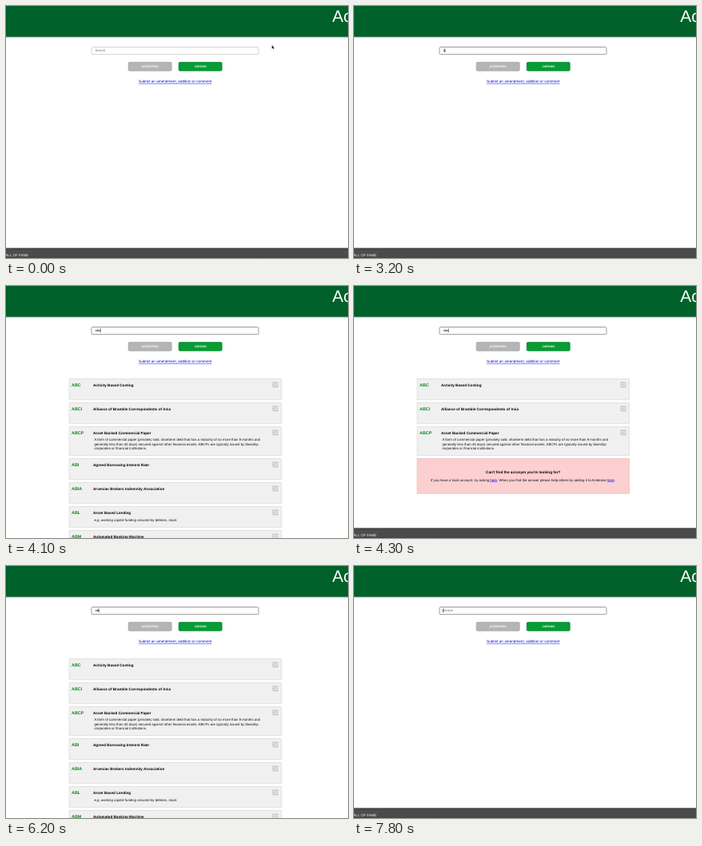
Write an HTML page that moves like this. It is 428x316 px and loops after 8000 ms.

```html
<!DOCTYPE html>
<html lang="en">
<head>
<meta charset="utf-8">
<title>Acronym search</title>
<style>
  html, body { margin: 0; width: 100%; height: 100%; overflow: hidden; background: #fff; }
  svg { display: block; width: 428px; height: 316px; }
  text { font-family: "Liberation Sans", Arial, sans-serif; text-rendering: geometricPrecision; white-space: pre; }
  .bold { font-weight: bold; }
  .code { font-size: 5.4px; font-weight: bold; fill: #00891c; }
  .title { font-size: 4.65px; font-weight: bold; fill: #000; }
  .note { font-size: 4.35px; fill: #111; }
  .link { fill: #0000e6; text-decoration: underline; }
  .button { font-size: 3.6px; font-weight: bold; fill: #fff; text-anchor: middle; }
  .mid { text-anchor: middle; }
</style>
</head>
<body>
<svg viewBox="0 0 428 316">
  <defs>
    <linearGradient id="shade" x2="0" y2="1">
      <stop offset="0" stop-color="#000" stop-opacity=".3"/>
      <stop offset="1" stop-color="#000" stop-opacity="0"/>
    </linearGradient>
    <linearGradient id="foot" x2="0" y2="1">
      <stop offset="0" stop-color="#414141"/>
      <stop offset=".3" stop-color="#4d4d4d"/>
      <stop offset="1" stop-color="#484848"/>
    </linearGradient>
    <g id="edit" fill="none" stroke="#a2a2a2" stroke-width=".8">
      <path d="M4.4 .9H1.2Q.4 .9 .4 1.7V5.8Q.4 6.6 1.2 6.6H5.4Q6.2 6.6 6.2 5.8V3.6"/>
      <path d="M2.4 4.7L2.8 3.3L5.8 .3L6.8 1.3L3.8 4.3Z" stroke-width=".6"/>
    </g>
  </defs>
  <rect width="428" height="316" fill="#fff"/>
  <rect y="38.5" width="428" height="2" fill="url(#shade)"/>
  <rect width="428" height="38.7" fill="#00612a"/>
  <text x="408.3" y="20" font-size="21" fill="#fff">Acletome</text>

  <rect id="field" x="107" y="51.5" width="209" height="9.2" rx="1.4" fill="#fff" stroke-width=".9"/>
  <text id="query" x="111.5" y="57.3" font-size="4"/>
  <rect id="caret" y="53.4" width=".7" height="4.8" fill="#111"/>

  <rect x="153.2" y="70.6" width="54" height="10.7" rx="1.4" fill="#b5b5b5" stroke="#9c9c9c" stroke-width=".7"/>
  <text class="button" x="180.1" y="77.3">ACRONYMS</text>
  <rect x="216.2" y="70.6" width="54" height="10.7" rx="1.4" fill="#069c34" stroke="#05802a" stroke-width=".7"/>
  <text class="button" x="243.2" y="77.3">JARGON</text>
  <text class="link mid" x="211.7" y="96" font-size="4.65">Submit an amendment, addition or comment</text>

  <g id="results"></g>
  <g id="footer">
    <rect y="303.4" width="428" height="13" fill="url(#foot)"/>
    <text x="28.2" y="313.9" font-size="4.5" text-anchor="end" fill="#f2f2f2">HALL OF FAME</text>
  </g>
  <path id="arrow" d="M0 0V4.7L1.1 3.8L1.9 5.5L2.7 5.1L1.9 3.5H3.3Z" fill="#000" stroke="#fff" stroke-width=".3"/>
  <path id="beam" d="M-1.3-3H-.4Q0-3 0-2.5Q0-3 .4-3H1.3M0-2.5V2.5M-1.3 3H-.4Q0 3 0 2.5Q0 3 .4 3H1.3" fill="none" stroke="#222" stroke-width=".75"/>
</svg>
<script>
const LOOP = 8000;
const $ = id => document.getElementById(id);
const here = '<tspan class="link">here</tspan>';

// Entries: code, title, then description lines
const abc = [
  ['ABC', 'Activity Based Costing'],
  ['ABCI', 'Alliance of Bramble Correspondents of Irvia'],
  ['ABCP', 'Asset Backed Commercial Paper',
    'A form of commercial paper (privately sold, shortterm debt that has a maturity of no more than 9 months and',
    'generally less than 45 days) secured against other financial assets. ABCPs are typically issued by bluechip',
    'corporates or financial institutions.']
];
const ab = [
  ...abc,
  ['ABI', 'Agreed Borrowing Interest Rate'],
  ['ABIA', 'Arvenian Brokers Indemnity Association'],
  ['ABL', 'Asset Based Lending', 'e.g. working capital funding secured by debtors, stock'],
  ['ABM', 'Automated Banking Machine']
];
const a = [
  ['2FA', 'Two Factor Authentication', 'Multiple pieces of data used to validate a customer.'],
  ['12WLA', '12 Weeks Look Ahead'],
  ['/al/', 'Acletome',
    "An acronym reference tool - type in the acronym to search for it's meaning. One can back search for an acronym",
    'by clicking the "Acronyms &amp; Titles" button and typing in a search. Results will dynamically appear below.',
    '', `Further information may be found ${here}.`],
  ['AA', 'Acceptance Area'],
  ['AAF', 'Affordability assessment form', 'Form used in conjunction with scoring to assess affordability of loan applicant.'],
  ['AAL', 'AVOKS Admin Ltd', 'Company behind AVOKS.'],
  ['AAM', 'Average Annual Margin']
];

const label = (cls, x, y, s) => `<text class="${cls}" x="${x}" y="${y}">${s}</text>`;
const box = (y, h, fill, line) =>
  `<rect x="79" y="${y}" width="265.4" height="${h}" fill="${fill}" stroke="${line}" stroke-width=".7"/>`;

function card([code, title, ...lines], y) {
  const h = 26 + Math.max(0, lines.length - 1) * 5.1;
  const svg = box(y, h, '#f0f0f0', '#d9d9d9') +
    label('code', 82, y + 9.8, code) + label('title', 109, y + 9.8, title) +
    lines.map((s, i) => label('note', 110.4, y + 18.1 + i * 5.1, s)).join('') +
    `<use href="#edit" x="333.8" y="${y + 3.7}"/>`;
  return { svg, next: y + h + 4 };
}

function page(entries, missing) {
  let y = 116.3, svg = '';
  for (const entry of entries) {
    const c = card(entry, y);
    svg += c.svg;
    y = c.next;
  }
  if (missing) {
    svg += box(216.4, 43.8, '#fccfd0', '#efb9ba') +
      label('title mid', 211.7, 234.8, "Can't find the acronym you're looking for?") +
      label('note mid', 211.5, 244.5, `If you have a Vusk account, try asking ${here}. ` +
        `When you find the answer please help others by adding it to Acletome ${here}.`);
  }
  return svg;
}

const pages = { none: '', a: page(a), ab: page(ab), abc: page(abc, true) };
const typed = [[0, ''], [3100, 'a'], [3600, 'ab'], [4100, 'abc'], [6000, 'ab'], [6400, 'a'], [7000, '']];
const shown = [[0, 'none'], [3300, 'a'], [3700, 'ab'], [4200, 'abc'], [6200, 'ab'], [6600, 'a'], [7000, 'none']];
const blink = [900, 1500, 2100, 2600, 3100, 4700, 4900, 5500, 5700, 7200, 7700];
const advance = { a: .556, b: .556, c: .5 };

const at = (track, t) => track.filter(k => k[0] <= t).pop()[1];
const show = (id, on) => $(id).setAttribute('visibility', on ? 'visible' : 'hidden');
const move = (id, x, y) => $(id).setAttribute('transform', `translate(${x} ${y})`);
let current = null;

function draw(t) {
  const text = at(typed, t), view = at(shown, t);
  $('query').textContent = text || 'Search';
  $('query').setAttribute('fill', text ? '#111' : '#666');
  $('field').setAttribute('stroke', t < 800 ? '#cfcfcf' : '#8f8f8f');

  const width = [...text].reduce((w, ch) => w + advance[ch] * 4, 0);
  $('caret').setAttribute('x', 111.3 + width);
  show('caret', blink.filter(k => k <= t).length % 2);

  if (view !== current) {
    $('results').innerHTML = pages[view];
    current = view;
  }
  show('footer', view === 'none' || view === 'abc');

  // The pointer glides into the field in 100 ms steps
  const p = Math.min(1, Math.floor(t / 100) / 4);
  const ease = p * p * (3 - 2 * p);
  const x = 332.7 - 27.5 * ease, inside = p > .5;
  show('arrow', !inside);
  show('beam', inside && t < 3100);
  move('arrow', x, 49 + 2 * ease);
  move('beam', x, 55.4);
}

function tick() {
  draw(performance.now() % LOOP);
  requestAnimationFrame(tick);
}
tick();
</script>
</body>
</html>
```
